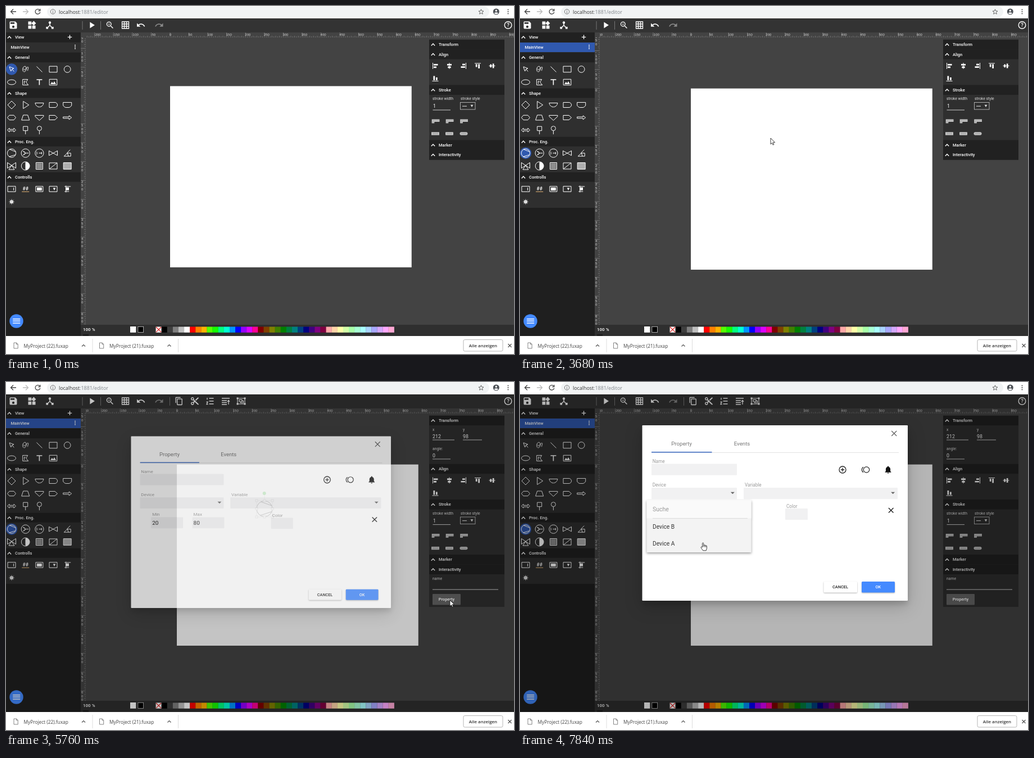
Write an HTML page that moves like this. It is 904 px wide and 619 px high and loops after 8000 ms.

```html
<!DOCTYPE html>
<html lang="en">
<head>
<meta charset="utf-8">
<title>Editor</title>
<style>
html, body { margin: 0; width: 100%; height: 100%; overflow: hidden; background: #fff; }
svg { display: block; width: 904px; height: 619px; font-family: Roboto, sans-serif; }
.ui { font-family: "Open Sans", sans-serif; }
.ruler { font: 6px "Liberation Sans", sans-serif; fill: #d4d4d4; }
#dialog { filter: drop-shadow(0 6px 5px rgba(0,0,0,.14)) drop-shadow(0 9px 15px rgba(0,0,0,.2)); }
.raised { filter: drop-shadow(0 1px 1px rgba(0,0,0,.3)); }
#menu { filter: drop-shadow(0 2px 2px rgba(0,0,0,.38)); }
</style>
</head>
<body>
<svg id="stage" viewBox="0 0 904 619"></svg>
<script>
const rect = (x, y, w, h, fill, more = '') =>
  `<rect x="${x}" y="${y}" width="${w}" height="${h}" fill="${fill}" ${more}/>`;
const path = (x, y, d, more = '') => `<path transform="translate(${x} ${y})" d="${d}" ${more}/>`;
const line = (x, y, d, color = '#fff', w = 1) =>
  path(x, y, d, `fill="none" stroke="${color}" stroke-width="${w}"`);
const text = (x, y, s, size = 7.5, fill = '#fff', more = '') =>
  `<text x="${x}" y="${y + size * .36}" font-size="${size}" fill="${fill}" ${more}>${s}</text>`;
const group = (id, body, more = '') => `<g id="${id}" ${more}>${body}</g>`;
const ring = (rx, ry = rx) => `M${-rx} 0a${rx} ${ry} 0 1 0 ${2 * rx} 0a${rx} ${ry} 0 1 0 ${-2 * rx} 0z`;
// 24-unit icon centred on x, y
const icon = (x, y, d, fill = '#fff', k = .7) =>
  `<path transform="translate(${x} ${y}) scale(${k}) translate(-12 -12)" d="${d}" fill="${fill}"/>`;
const bold = 'font-weight="500"', mid = 'text-anchor="middle"';
const blue = '#3059af', dark = '#212121', pane = '#2f2f2f';
const cross = r => `M${-r} ${-r}L${r} ${r}M${r} ${-r}L${-r} ${r}`;
const box = (w, h) => `M${-w} ${-h}H${w}V${h}H${-w}z`;

const icons = {
  save: 'M17 3H5a2 2 0 0 0-2 2v14a2 2 0 0 0 2 2h14a2 2 0 0 0 2-2V7l-4-4zm-5 16a3 3 0 1 1 0-6 3 3 0 0 1 0 6zm3-10H5V5h10v4z',
  widgets: 'M13 13v8h8v-8h-8zM3 21h8v-8H3v8zM3 3v8h8V3H3zm13.66-1.31L11 7.34 16.66 13l5.66-5.66-5.66-5.65z',
  hub: 'M17 16l-4-4V8.82A3 3 0 1 0 9 6a3 3 0 0 0 2 2.82V12l-4 4H3v5h5v-3.05l4-4.2 4 4.2V21h5v-5h-4z',
  play: 'M8 5v14l11-7z',
  zoom: 'M15.5 14h-.79l-.28-.27A6.5 6.5 0 1 0 13.73 14.43l.27.28v.79l5 4.99L20.49 19l-4.99-5zm-6 0a4.5 4.5 0 1 1 0-9 4.5 4.5 0 0 1 0 9zm2.5-4h-2v2H9v-2H7V9h2V7h1v2h2v1z',
  undo: 'M12.5 8c-2.65 0-5.05.99-6.9 2.6L2 7v9h9l-3.62-3.62c1.39-1.16 3.16-1.88 5.12-1.88 3.54 0 6.55 2.31 7.6 5.5l2.37-.78C21.08 11.03 17.15 8 12.5 8z',
  redo: 'M11.5 8c2.65 0 5.05.99 6.9 2.6L22 7v9h-9l3.62-3.62c-1.39-1.16-3.16-1.88-5.12-1.88-3.54 0-6.55 2.31-7.6 5.5l-2.37-.78C2.92 11.03 6.85 8 11.5 8z',
  copy: 'M16 1H4a2 2 0 0 0-2 2v14h2V3h12V1zm3 4H8a2 2 0 0 0-2 2v14a2 2 0 0 0 2 2h11a2 2 0 0 0 2-2V7a2 2 0 0 0-2-2zm0 16H8V7h11v14z',
  cut: 'M9.64 7.64A4 4 0 1 0 7.64 9.64L10 12l-2.36 2.36A4 4 0 1 0 9.64 16.36L12 14l7 7h3v-1L9.64 7.64zM6 8a2 2 0 1 1 0-4 2 2 0 0 1 0 4zm0 12a2 2 0 1 1 0-4 2 2 0 0 1 0 4zM19 3l-6 6 2 2 7-7V3z',
  bell: 'M12 22a2 2 0 0 0 2-2h-4a2 2 0 0 0 2 2zm6-6v-5c0-3.07-1.64-5.64-4.5-6.32V4a1.5 1.5 0 0 0-3 0v.68C7.63 5.36 6 7.92 6 11v5l-2 2v1h16v-1l-2-2z'
};

function browser() {
  const file = (x, n) =>
    line(x + 17.5, 604, 'M-3.5-5H1.2L3.7-2.5V5H-3.5zM1-5V-2.3H3.7', '#777', .9) +
    text(x + 31.5, 605, `MyProject (${n}).fuxap`, 8.3, '#444', 'class="ui"') +
    line(x + 138, 604, 'M-3 1.5L0-1.5 3 1.5', '#555', 1.2) + rect(x + 153.5, 592, 1, 24, '#ddd');
  return rect(0, 0, 904, 22, '#fff') + rect(73, 1, 787, 18.5, '#f1f3f4', 'rx="9.2"') +
    line(13, 10, 'M5 0H-4M0-4.5L-4.5 0 0 4.5', '#444', 1.3) +
    line(35, 10, 'M-5 0H4M0-4.5L4.5 0 0 4.5', '#bbb', 1.3) +
    line(56.5, 10, 'M3.6-2.6A4.4 4.4 0 1 0 4.3 1M4.3-5V-1.4H.8', '#444', 1.3) +
    line(83.5, 10, ring(4.2) + 'M0-.5V2.6M0-2.5V-1.4', '#666', .9) +
    text(94, 10.3, 'localhost<tspan fill="#80868b">:1881/editor</tspan>', 8.9, '#333', 'class="ui"') +
    line(845.5, 10.3, 'M0-4.5L1.3-1.4 4.5-1.2 2 .9 2.8 4 0 2.3-2.8 4-2 .9-4.5-1.2-1.3-1.4z', '#555', .9) +
    path(872.3, 10, ring(5.5), 'fill="#4d5156"') + path(872.3, 8.3, ring(1.7), 'fill="#fff"') +
    path(872.3, 12.8, ring(3.2, 1.6), 'fill="#fff"') +
    [-3.5, 0, 3.5].map(d => path(893.5, 10 + d, ring(1), 'fill="#444"')).join('') +
    rect(0, 587, 904, 32, '#fff') + file(0, 22) + file(152.5, 21) +
    rect(814, 593.5, 70, 20.5, '#fff', 'rx="2.5" stroke="#b5b5b5"') +
    text(849, 603.8, 'Alle anzeigen', 7.9, '#333', `class="ui" font-weight="600" ${mid}`) +
    line(896.5, 604, cross(3), '#555', 1.3);
}

function toolbar() {
  const list = 'M-2-5H6M-2 0H6M-2 5H6';
  const corners = [-6.5, 6.5].flatMap(x => [-5, 5].map(y => rect(417 + x, 32.5 + y, 3, 3, '#fff'))).join('');
  const extra = rect(291, 27, 1, 15, '#777') + icon(308, 34, icons.copy, '#fff', .65) +
    icon(336, 34, icons.cut) +
    line(363.5, 34, list + 'M-5.5-6V-2.5M-7 1.5H-4.5L-6.5 5.5H-4', '#fff', 1.3) +
    line(391, 34, 'M-7-5H7M-7-1H2M-7 2.5H2M-7 6H2M5 6V-1M3 1L5-1.5 7 1', '#fff', 1.3) +
    line(418.5, 34, box(6.5, 5) + 'M-3.5-2.5H1.5V1H-3.5zM1.5-.5H4V3H-1V1', '#fff', 1.1) + corners;
  return rect(0, 22, 904, 25, '#333') + icon(13, 34, icons.save, '#fff', .72) +
    icon(46, 34, icons.widgets, '#fff', .72) + icon(78, 34, icons.hub, '#fff', .74) +
    rect(135.5, 27, 1, 15, '#777') + icon(152.5, 34, icons.play, '#fff', .78) + rect(168, 27, 1, 15, '#777') +
    icon(185, 34, icons.zoom) + line(212.5, 34, box(6, 6) + 'M-6-2H6M-6 2H6M-2-6V6M2-6V6', '#fff', 1.3) +
    icon(240, 34, icons.undo) + icon(272.5, 34, icons.redo, '#8a8a8a') +
    line(893.5, 34, ring(6.3), '#fff', 1.4) + text(893.5, 34, '?', 9.5, '#fff', `${mid} ${bold}`) +
    group('edit', extra);
}

function header(x, w, y, label, h = 17.5) {
  return rect(x, y, w, h, dark) + line(x + 7, y + 9, 'M-3.2 1.7L0-1.6 3.2 1.7', '#fff', 1.4) +
    text(x + 17, y + 8.6, label, 7.5, '#fff', bold);
}

function sidebar() {
  const cols = [10, 34.7, 59.4, 84, 109.2];
  const row = (y, ...ds) => ds.map((d, i) => line(cols[i], y, d)).join('');
  const white = 'fill="#fff"';
  const hatch = (x, y, w, h, d) => line(x, y, box(w, h)) + line(x, y, d, '#fff', .6);
  const rows = (w, h, step) => {
    let d = '';
    for (let y = -h; y <= h; y += step) d += `M${-w} ${y}H${w}`;
    return d;
  };
  let diag = '';
  for (let k = -8; k <= 8; k += 2) {
    const a = Math.max(-5, -5 + k), b = Math.min(5, 5 + k);
    diag += `M${a} ${a - k}L${b} ${b - k}M${a} ${k - a}L${b} ${k - b}`;
  }
  return rect(0, 47, 133, 540, '#1f1f1f') + rect(0, 47, 133, 312, pane) +
    header(-1, 134, 46.7, 'View', 18) + line(113.5, 55.3, 'M-3.7 0H3.7M0-3.7V3.7', '#fff', 1.3) +
    group('row', rect(0, 65, 133, 17, blue)) + text(8.5, 73, 'MainView', 7.5, '#fff', bold) +
    [-3, 0, 3].map(d => path(123, 72.7 + d, ring(.95), white)).join('') +
    header(-1, 134, 82.7, 'General') + header(-1, 134, 146.5, 'Shape', 17) +
    header(-1, 134, 232.7, 'Proc. Eng.', 17) + header(-1, 134, 295.7, 'Controlls', 17) +
    group('mark', path(0, 0, ring(10.2), `fill="${blue}"`)) +
    row(112.5, 'M-4-4.5L4-1.5 .7-.2 4.2 4M-4-4.5L-1.3 3.5 .7-.2', 'M-4 4C-8-4 1-8 1-3S-4 2-3-1M-3 4.5C2 5 1-4 4-4S2 4 4.5 2',
      'M-5-5L5 5', box(7, 5.3), ring(5.8)) +
    row(135.5, ring(7.5, 4.4), 'M-5-5H4L1 0 5 5H-5zM-2 3V-2H0') +
    line(59.4, 135.5, 'M-5-4.5H5M0-4.5V5', '#fff', 1.6) + line(84, 135.5, box(6.8, 5.2)) +
    path(84, 135.5, 'M-5 3.5L-2.2-.5 0 2 2-1.5 5 3.5z', white) +
    row(176, 'M0-7L7 0 0 7-7 0z', 'M-4-6.5L6 0-4 6.5z', 'M-7.5-3.5H7.5C6 6-6 6-7.5-3.5z',
      'M-7-4.5H3A4.5 4.5 0 0 1 3 4.5H-7z', 'M-7.5-4.5H7.5V1Q5 4.5 3 4.5H-3Q-5 4.5-7.5 1z') +
    row(198.5, 'M-4-4.2H4L7.5 0 4 4.2H-4L-7.5 0z', 'M-4-4.5H4L7 4.5H-7z', 'M-7.5-4H7.5V-2L0 5-7.5-2z',
      'M-7-4H3L7.5 0 3 4H-7z', 'M-7.5-1.3H3V-3.5L7.5 0 3 3.5V1.3H-7.5z') +
    row(220.7, 'M-7.5 0L-4-3.5V-1.3H4V-3.5L7.5 0 4 3.5V1.3H-4V3.5z', 'M-4-6.5H4V1H-4zM0 1V7.5', 'M0 1V7.5M-4-3a4 4 0 1 0 8 0a4 4 0 1 0-8 0') +
    row(261.7, ring(7.6) + 'M-3.5-6.6L7.2-2.5M-4.2 6.2L7 3', ring(7.6) + 'M-4.5-3.5L0 0-4.5 3.5M0 0H5.5M-3.5-3.5L0-.6M-3.5 3.5L0 .6',
      ring(7.6) + 'M-5-2.5Q-3 0-5 2.5M-1 0H4M4-2V2', 'M-7.5-4.2V4.2L7.5-4.2V4.2z', 'M-6 5.5L0 0H6V5.5zM-1 0L5-6M0 0L2 5.5') +
    row(284.5, 'M-7.5-6V4L7.5-6V4zM0-1L-5 6.5H5z', ring(7.4)) + path(34.7, 284.5, 'M0-7.4A7.4 7.4 0 0 1 0 7.4z', white) +
    path(34.7, 284.5, 'M0-5.5L6 0 0 5.5z', white) + hatch(59.4, 284.5, 6, 6, diag) +
    line(84, 284.5, box(7, 5.5) + 'M-7 5.5L7-5.5') +
    rect(102.5, 279, 13.4, 11, '#8c8c8c') + hatch(109.2, 284.5, 7, 5.8, rows(7, 5, 2)) +
    line(10, 325.5, box(7, 4.8) + 'M3.5-2.5V2.5') + text(34.7, 324.5, '##', 8.5, '#fff', mid + ' ' + bold) +
    line(34.7, 325.5, 'M-6.5 4.8H6.5', '#e8b878') +
    line(59.4, 325.5, box(6.5, 4.7)) + rect(55, 322.8, 8.8, 5.4, '#fff') +
    line(84, 325.5, box(7, 4.8)) + path(86, 325.5, 'M-2.3-2H2.3L0 2.5z', white) +
    line(109.2, 325.5, 'M-5-4.5H6M-2.5-6V6M-5 4.5H3') + rect(106, 322.7, 6, 5, '#fff') +
    path(10, 348.3, ring(3), white) + line(10, 348.3, cross(3.6) + 'M-5 0H5M0-5V5', '#ccc', .8) +
    path(18.5, 560.5, ring(12.2), 'fill="#448aff"') + line(18.7, 560.3, 'M-6.5-3.6H6.5M-6.5 0H6.5M-6.5 3.6H6.5', '#fff', 1.5);
}

const unit = .6715;
// rulers and white sheet with the sheet corner at ox, oy
function sheet(id, ox, oy) {
  let ticks = '', across = '', down = '';
  for (let u = -300; u <= 950; u += 5) {
    const x = ox + u * unit, y = oy + u * unit, big = u % 50 === 0, n = big ? 9 : u % 10 ? 2 : 3;
    if (x > 142 && x < 904) ticks += `M${x} 56V${56 - n}`;
    if (y > 56 && y < 567) ticks += `M142 ${y}H${142 - n}`;
    if (!big) continue;
    across += `<text x="${x - 1}" y="52.6">${u}</text>`;
    [...String(u)].forEach((c, i) => down += `<text x="134" y="${y + 4.8 + i * 6.3}">${c}</text>`);
  }
  return group(id, `<path d="${ticks}" stroke="#9a9a9a" stroke-width=".55"/>` +
    `<g class="ruler" clip-path="url(#top)">${across}</g><g class="ruler" clip-path="url(#left)">${down}</g>` +
    rect(ox, oy, 640 * unit, 480 * unit, '#fff'));
}

function shape() {
  const grips = [[446, 211], [460, 211], [474, 211], [446, 225.5], [474, 225.5], [446, 240], [460, 240], [474, 240]];
  return line(460, 225.5, ring(14) + 'M-6.5-12.4L13.2-5.5M-7.5 11.8L13.2 5', '#222', 1) +
    line(460, 225.5, box(14, 14.5) + 'M0-14.5V-25', '#bbb', .7) +
    grips.map(([x, y]) => rect(x - 2, y - 2, 4, 4, '#fff', 'stroke="#aaa" stroke-width=".8"')).join('') +
    path(459.7, 198, ring(3), 'fill="#2fc52f"');
}

function colors() {
  const bright = [0, 30, 42, 100, 115, 150, 170, 205, 240, 275, 292, 325];
  const list = ['#fff', '#000', '#3f3f3f', '#7f7f7f', '#bfbfbf', '#fff',
    ...bright.map(h => `hsl(${h} 100% 50%)`),
    ...bright.map((_, i) => `hsl(${i * 30} 100% 25%)`),
    ...bright.map((_, i) => `hsl(${i * 30} 100% 83%)`)];
  return rect(133, 567, 771, 20, pane) + rect(137, 584, 10, 3, '#1c1c1c') +
    text(137, 575, '100 %', 8, '#fff', bold) +
    rect(221, 570, 10.3, 10.8, '#fff') + rect(234.8, 570.3, 9.8, 10.2, '#000', 'stroke="#ccc" stroke-width=".8"') +
    list.map((c, i) => rect(266.6 + i * 10.1, 570.5, 10.2, 10.3, c)).join('') +
    line(271.6, 575.6, cross(4.6), '#d22', 1.2);
}

function panel() {
  const field = (x, y, label, value, w) => text(x, y, label, 6.8, '#ddd') +
    text(x, y + 12.5, value, 8.8) + rect(x, y + 18, w, 1, '#ccc');
  const align = (x, y, d) => path(x, y, d, 'fill="#fff"');
  const left = 'M-5-5.5H-4V5.5H-5zM-3-3.5H4.5V-.8H-3zM-3 1H2V3.7H-3z';
  const center = 'M-.5-5.5H.5V5.5H-.5zM-4-3.5H4V-.8H-4zM-2.7 1H2.7V3.7H-2.7z';
  const turn = (d, x, y, a) => `<path transform="translate(${x} ${y}) rotate(${a})" d="${d}" fill="#fff"/>`;
  const join = x => line(x, 205, 'M7-1.3H-4.5V3.5', '#c4c4c4', 4.6) + line(x, 205, 'M7-1.3H-4.5V3.5', '#999', .8);
  const cap = (x, r) => rect(x - 7, 224.3, 14, 5.4, '#c4c4c4', `rx="${r}"`) + rect(x - 5, 226.6, 10, .8, '#888');
  const rest = header(753, 134, 77.2, 'Align') + align(764, 106.5, left) + align(789, 106.5, center) +
    turn(left, 814, 106.5, 180) + turn(left, 839.5, 106.5, 90) + turn(center, 865, 106.5, 90) + turn(left, 764, 129, -90) +
    header(753, 134, 140.5, 'Stroke') + text(759, 164.7, 'stroke width', 6.8, '#ddd') +
    text(809, 164.7, 'stroke style', 6.8, '#ddd') + text(760, 178, '1', 8.8) + rect(759.5, 184.5, 31.5, 1, '#ccc') +
    rect(808.5, 171.5, 26.5, 12.5, 'none', 'stroke="#bbb" stroke-width=".9"') + rect(812, 177.7, 8, .9, '#fff') +
    path(829, 177.7, 'M-2.4-2H2.4L0 2.3z', 'fill="#ddd"') +
    [764.5, 789.5, 815].map(join).join('') + cap(764, 0) + cap(789, 1) + cap(814.5, 2.7) +
    header(753, 134, 238.5, 'Marker') + header(753, 134, 256, 'Interactivity') +
    group('props', text(759, 281, 'name', 6.8, '#ddd') + rect(759, 300, 117, 1, '#ccc') +
      rect(759, 308.4, 50, 19.6, '#666', 'rx="1"') + text(784, 318, 'Property', 7.3, '#fff', `font-weight="700" ${mid}`));
  return rect(753, 60, 134, 214, pane, 'id="back"') + header(753, 134, 59.7, 'Transform') +
    group('place', field(759, 84.5, 'x', '212', 39) + field(813, 84.5, 'y', '98', 34) + field(759, 118.5, 'angle:', '0', 32)) +
    group('rest', rest);
}

function dialog() {
  const label = (x, y, s) => text(x, y, s, 8.2, '#9a9a9a');
  const input = (x, y, w, s = '') => rect(x, y, w, 20.3, '#f1f1f2', 'rx="1"') + text(x + 2, y + 10.2, s, 10.2, '#222');
  const drop = (x, y) => path(x, y, 'M-3.5-1.7H3.5L0 1.8z', 'fill="#666"');
  return rect(217.5, 77, 472.5, 312, '#fff', 'rx="1"') + line(665.7, 91.5, cross(4.5), '#666', 1.3) +
    text(287.5, 109.3, 'Property', 9.7, '#777', mid) + text(395, 109.3, 'Events', 9.7, '#777', mid) +
    rect(234, 125, 440, .8, '#ddd') + rect(234, 124, 107.5, 1.6, '#4470c4') +
    label(235.7, 140.7, 'Name') + input(234, 145.5, 152) +
    line(574, 156, ring(6) + 'M-3.2 0H3.2M0-3.2V3.2', '#222', 1.3) +
    line(616.5, 156, ring(5.2) + 'M-5.5-4.7A5.5 5.5 0 0 0-5.5 4.7', '#222', 1.2) + icon(655, 156, icons.bell, '#111', .68) +
    label(235.7, 183, 'Device') + input(234, 188, 152) + drop(378.3, 197.5) +
    label(400, 183, 'Variable') + input(398, 188, 274) + drop(663.6, 197.5) +
    label(256, 219, 'Min') + input(254, 224, 58, '20') + label(331, 219, 'Max') + input(329, 224, 58, '80') +
    label(474, 220.7, 'Color') + input(472, 225, 40) + line(660.2, 228.3, cross(4.3), '#222', 1.4) +
    rect(540.5, 355, 59.5, 19.5, '#fff', 'rx="1.5" class="raised"') + text(570, 364.5, 'CANCEL', 7.4, '#222', `${bold} ${mid}`) +
    rect(608, 355, 59, 19.5, '#448aff', 'rx="1.5" class="raised"') + text(637.3, 364.5, 'OK', 7.4, '#fff', `${bold} ${mid}`);
}

const menu = rect(225.5, 210, 186, 93, '#f3f3f3') + rect(225.5, 210, 186, 32.5, '#fafafa') + rect(236, 242, 169, .8, '#d5d5d5') +
  group('words', text(236, 226.3, 'Suche', 10.5, '#9a9a9a') + text(236, 257, 'Device B', 10.2, '#333') + text(236, 287.3, 'Device A', 10.2, '#333'));

const ink = 'fill="#fff" stroke="#111" stroke-width=".8" stroke-linejoin="round"';
const cursor = path(0, 0, 'M0 0V10.8L2.5 8.5 4.1 12.2 5.8 11.4 4.2 7.8H7.7z', ink + ' id="arrow"') +
  path(0, 0, 'M-1 8V1.2a1.1 1.1 0 0 1 2.2 0V4.8a1 1 0 0 1 2 .2 1 1 0 0 1 2 .6 .9 .9 0 0 1 1.7.7V9.8L5.7 13.8H.2L-3.2 9C-4.2 7.3-2.2 6.4-1 8zM1.2 5V7.5M3.2 5.3V7.6M5.2 5.9V7.8', ink + ' id="hand"');

const stage = document.getElementById('stage');
stage.innerHTML = `<defs><clipPath id="top"><path d="M142 47H904V57H142z"/></clipPath>
  <clipPath id="left"><path d="M133 56H143V567H133z"/></clipPath></defs>` +
  rect(0, 0, 904, 619, '#434343') + sheet('before', 292, 142.5) + sheet('after', 304, 146.7) +
  group('shape', shape()) + colors() + sidebar() + toolbar() + panel() +
  rect(0, 22, 904, 565, '#000', 'id="shade"') + browser() +
  group('dialog', dialog()) + group('menu', menu) +
  path(0, 0, ring(9), 'id="flash" fill="#d2cc10" fill-opacity=".75"') + group('cursor', cursor);

const $ = {};
stage.querySelectorAll('[id]').forEach(el => $[el.id] = el);
const show = (name, on) => $[name].setAttribute('display', on ? 'inline' : 'none');
const set = (name, key, value) => $[name].setAttribute(key, value);

// pointer tip: time, x, y
const track = [
  [480, 269, 447], [640, 240, 390], [960, 122, 165], [1120, 85, 100], [1280, 69, 75.5], [1760, 69, 75.5],
  [2080, 66, 95], [2400, 25, 215], [2560, 11.5, 257], [2720, 10.5, 261.5], [3040, 10.5, 261.5],
  [3200, 70, 258], [3520, 350, 240], [3680, 446, 235], [4160, 446, 235], [4320, 490, 256],
  [4640, 790, 385], [4800, 879, 407], [4960, 798, 397], [5120, 791, 390], [5280, 790, 388], [5920, 790, 388],
  [6080, 782, 386], [6560, 658, 361], [6880, 430, 238], [7040, 340, 204], [7200, 310, 198.5],
  [7360, 311, 212], [7680, 325, 274], [7840, 325.5, 286]
];
function pointer(t) {
  const i = track.findIndex(k => k[0] >= t);
  if (i < 1) return i ? track.at(-1).slice(1) : track[0].slice(1);
  const [a, ax, ay] = track[i - 1], [b, bx, by] = track[i], f = (t - a) / (b - a);
  return [ax + (bx - ax) * f, ay + (by - ay) * f];
}

function draw(t) {
  const opened = t >= 1600, armed = t >= 3040, placed = t >= 3840, opening = t >= 5760 && t < 5920;
  show('before', !opened); show('after', opened); show('row', opened);
  set('mark', 'transform', armed ? 'translate(10 261.7)' : 'translate(10 112.5)');
  ['shape', 'edit', 'place', 'props'].forEach(name => show(name, placed));
  set('rest', 'transform', `translate(0 ${placed ? 68.6 : 0})`);
  set('back', 'height', placed ? 340 : 214);
  set('shade', 'opacity', t < 5760 ? 0 : opening ? .23 : .29);
  show('dialog', t >= 5760);
  set('dialog', 'opacity', opening ? .77 : 1);
  set('dialog', 'transform', opening ? 'translate(453.75 249.25) scale(.979) translate(-453.75 -233)' : '');
  show('menu', t >= 7360);
  set('menu', 'opacity', t < 7520 ? .5 : 1);
  set('words', 'opacity', t < 7840 ? .75 : 1);

  const at = `translate(${pointer(t)})`, hand = t >= 1280 && t < 3360 || t >= 7040;
  show('cursor', t >= 480); show('hand', hand); show('arrow', !hand);
  set('cursor', 'transform', at);
  show('flash', [2720, 5600, 7200].includes(t));
  set('flash', 'transform', at);
}

const step = 160, loop = 8000;
let last = -1;
function tick() {
  const t = Math.floor(performance.now() % loop / step) * step;
  if (t !== last) draw(last = t);
  requestAnimationFrame(tick);
}
tick();
</script>
</body>
</html>
```
